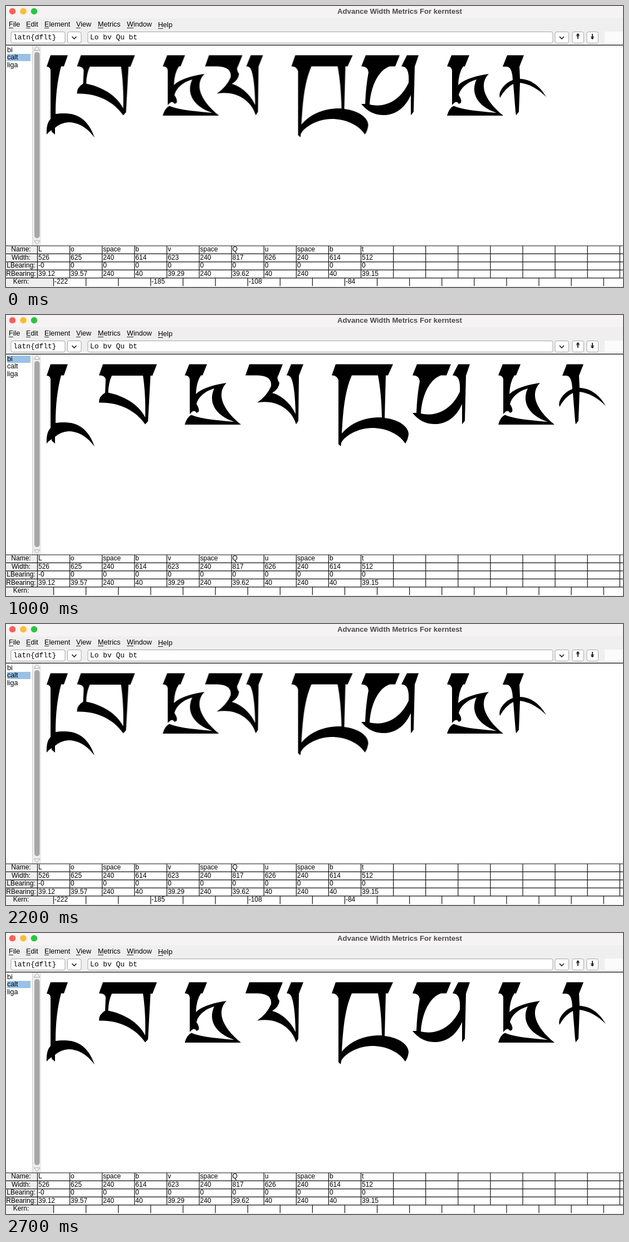
Write an HTML page that moves like this. It is 1108x505 px and loops after 2.8 s.

```html
<!DOCTYPE html>
<html lang="en">
<head>
<meta charset="utf-8">
<title>Metrics window</title>
<style>
  html, body { margin: 0; width: 100%; height: 100%; overflow: hidden; background: #f0efef; }
  svg { display: block; width: 1108px; height: 505px; }
  text { font: 12px "Liberation Sans", Arial, sans-serif; white-space: pre; }
  .title { font-weight: bold; font-size: 13.13px; fill: #4b4a4b; }
  .menu, .list { font-size: 12.6px; }
  .mono { font: 12.9px "Liberation Mono", "Courier New", monospace; }
  .field { fill: #fff; stroke: #a6a6a6; }
  .line { stroke: #111; stroke-width: 1.2; fill: none; }
  .icon { stroke: #222; stroke-width: 1.7; fill: none; }
  .pick { fill: #9ac2e6; animation: pick 2.8s step-end infinite; }
  .kern { animation: show 2.8s step-end infinite; }
  .glyph { animation: shift 2.8s step-end infinite; }

  @keyframes pick {
    0%, 78.571% { transform: translateY(13px); }
    35.714% { transform: none; }
    100% { transform: translateY(13px); }
  }
  @keyframes show {
    0%, 39.285% { visibility: visible; }
    3.571%, 82.142%, 100% { visibility: hidden; }
  }
  @keyframes shift {
    0%, 39.285% { transform: translateX(var(--kern)); }
    3.571%, 82.142%, 100% { transform: none; }
  }
</style>
</head>
<body>
<svg id="stage" viewBox="0 0 1108 505">
  <defs>
    <path id="L" d="M80 88.5H111L104 108.500H99Q89 145 89 194C96 192.500 110 192.500 117 194C139 198 152 216 159 236.500C144 216 127 209 112 209Q98 210 88 219V231L82 226V223Q77 226 73 231Q72 211 80 203V117Q80 109 73 109Z"/>
    <path id="o" fill-rule="evenodd" d="M174 88.500H271L263 109H259.500L255 191L250 196.500C232 170 200 156 167 157.500Q166 147 178 139.500L179 116Q178 108 167 108.500ZM190 109Q184 122 183.500 139.500C211 145 238 160 250 184C251 158 249 128 246 109Z"/>
    <path id="b" d="M329 88.500H361L353 108.500H350Q342 120 341 142C354 130 376 125 396 122C379 139 385 167 422 197H321Q325 183 333 179.500Q347 187 410 192C374 180 363 155 374 132C356 137 345 148 342 160Q348 169 346 174L342 176Q338 168 330 178V116Q329 108 321 108.500Z"/>
    <path id="v" d="M437 88.500H497L489 108.500Q485 113 491 122Q490 133 478 140C496 145 512 160 520 178Q519 128 512 113Q509 108 504 108.500L512 88.500H534L526 109L525 190L521 196.500C514 172 488 151 451 157.500Q469 145 476 128Q478 109 452 108.500H430Z"/>
    <path id="Q" fill-rule="evenodd" d="M592 88.500H695L686 108.500H682L680 185C706 188 723 201 723 214Q722 224 717 231C706 213 681 203 657 203C632 203 607 218 602 230L601 236L597 232V117Q594 108 585 108.500ZM621 108.500C607 140 605 181 603 213C621 192 647 183 675 184Q674 139 668 108.500Z"/>
    <path id="u" d="M738 88.500H799L791 108.500H781C760 116 747 145 745 177C775 184 801 168 815 138Q817 108 802 108.500L812 88.500H833L826 109L824 190L819 196.500V160C808 185 789 197 768 196Q745 195 730 176H737Q738 146 743 119Q742 108 730 108.500Z"/>
    <path id="t" d="M1007 88.500H1037L1029 109L1030 131C1054 132 1068 148 1077 163.500C1062 148 1046 140 1030 138L1028 190L1023 196.500L1022 190L1018 140Q1004 147 994 165Q991 156 1000 145Q1008 136 1017 133Q1016 109 1006 109H999Z"/>
    <path id="chevron" class="icon" d="M-4 -2L0 2L4 -2"/>
    <path id="arrow" d="M0 -5.500L3 -2.500H.8V-1.500H3V-.5H.8V4.500H-.8V-.5H-3V-1.500H-.8V-2.500H-3Z"/>
  </defs>

  <rect width="1108" height="22" fill="#f5f3f4"/>
  <circle cx="11.500" cy="9.500" r="5.800" fill="#fe6058"/>
  <circle cx="31" cy="9.500" r="5.800" fill="#febc30"/>
  <circle cx="50.500" cy="9.500" r="5.800" fill="#2ac642"/>
  <text class="title" x="707" y="14" text-anchor="middle">Advance Width Metrics For kerntest</text>
  <g id="menu"></g>

  <g class="field">
    <rect x="9" y="46.500" width="97" height="20" rx="3"/>
    <rect x="110.500" y="46.500" width="24.500" height="20" rx="3"/>
    <rect x="147" y="46.500" width="835" height="20" rx="3"/>
    <rect x="986" y="46.500" width="24.500" height="20" rx="3"/>
    <rect x="1017" y="46.500" width="20.500" height="20" rx="3"/>
    <rect x="1043" y="46.500" width="20.500" height="20" rx="3"/>
  </g>
  <rect x="1075" y="46" width="33" height="20" fill="#fbfbfb"/>
  <use href="#chevron" x="122.500" y="57"/>
  <use href="#chevron" x="998" y="57"/>
  <use href="#arrow" x="1027" y="54.500"/>
  <use href="#arrow" transform="translate(1053 54.500) scale(1 -1)"/>
  <text class="mono" x="13" y="60">latn{dflt}</text>
  <text class="mono" x="151" y="60">Lo bv Qu bt</text>

  <rect y="71" width="1108" height="360" fill="#fff"/>
  <rect x="47" y="71" width="16" height="360" fill="#ededed"/>
  <path d="M47.500 71V431" stroke="#cfcfcf"/>
  <rect x="51" y="83" width="9.500" height="334" rx="4.500" fill="#a7a7a7"/>
  <path d="M50.500 79.500L55.500 72.500L61 79.500ZM50.500 422L55.500 428.500L61 422Z" fill="#f3f3f3" stroke="#aaa"/>
  <path class="line" d="M0 70.300H1108"/>
  <rect class="pick" x="2" y="73" width="42" height="13"/>
  <text class="list" x="2" y="83">bi</text>
  <text class="list" x="2" y="96">calt</text>
  <text class="list" x="2" y="109.500">liga</text>

  <g id="glyphs"></g>
  <g id="table"></g>
</svg>
<script>
  const byId = id => document.getElementById(id);
  function add(parent, tag, attrs, content = '') {
    const el = document.createElementNS('http://www.w3.org/2000/svg', tag);
    for (const key in attrs) el.setAttribute(key, attrs[key]);
    el.textContent = content;
    return parent.appendChild(el);
  }

  const menuItems = { File: 5, Edit: 36, Element: 69, View: 126, Metrics: 165, Window: 217, Help: 273 };
  const initialWidth = { F: 8, E: 8, V: 8, M: 10, W: 12, H: 9 };
  for (const [name, x] of Object.entries(menuItems)) {
    const y = name === 'Help' ? 38 : 37;
    add(byId('menu'), 'text', { class: 'menu', x, y }, name);
    add(byId('menu'), 'path', { d: `M${x} ${y + 2.5}h${initialWidth[name[0]]}`, stroke: '#222' });
  }

  // Each glyph: shape, offset from the drawn shape, accumulated kerning
  const run = [
    ['L', 0, 0], ['o', 0, -39.5], ['b', 0, -39.5], ['v', 0, -72.5],
    ['Q', 0, -72.5], ['u', 0, -92], ['b', 563, -92], ['t', 0, -107]
  ];
  for (const [shape, x, kern] of run) {
    const g = add(byId('glyphs'), 'g', { class: 'glyph', style: `--kern:${kern}px` });
    add(g, 'use', { href: '#' + shape, x });
  }

  const grid = byId('table');
  const gridX = 56.5, gridY = 431, colWidth = 58.1, rowHeight = 14.45;
  const rows = {
    'Name:': 'L o space b v space Q u space b t',
    'Width:': '526 625 240 614 623 240 817 626 240 614 512',
    'LBearing:': '-0 0 0 0 0 0 0 0 0 0 0',
    'RBearing:': '39.12 39.57 240 40 39.29 240 39.62 40 240 40 39.15',
    'Kern:': '-222 . . -185 . . -108 . . -84'
  };
  Object.entries(rows).forEach(([label, values], row) => {
    const y = gridY + row * rowHeight, isKern = row === 4;
    const x0 = gridX + (isKern ? colWidth / 2 : 0);
    add(grid, 'rect', { x: x0, y, width: 1108 - x0, height: rowHeight, fill: '#fff' });
    add(grid, 'text', { x: 27, y: y + 10.3, 'text-anchor': 'middle' }, label);
    values.split(' ').forEach((value, i) => {
      if (value === '.') return;
      add(grid, 'text', { x: x0 + i * colWidth + 1.5, y: y + 10.3, class: isKern ? 'kern' : '' }, value);
    });
    let d = `M0 ${y}H1108`;
    for (let x = x0; x < 1108; x += colWidth) d += `M${x} ${y}v${rowHeight}`;
    add(grid, 'path', { class: 'line', d });
  });
</script>
</body>
</html>
```
